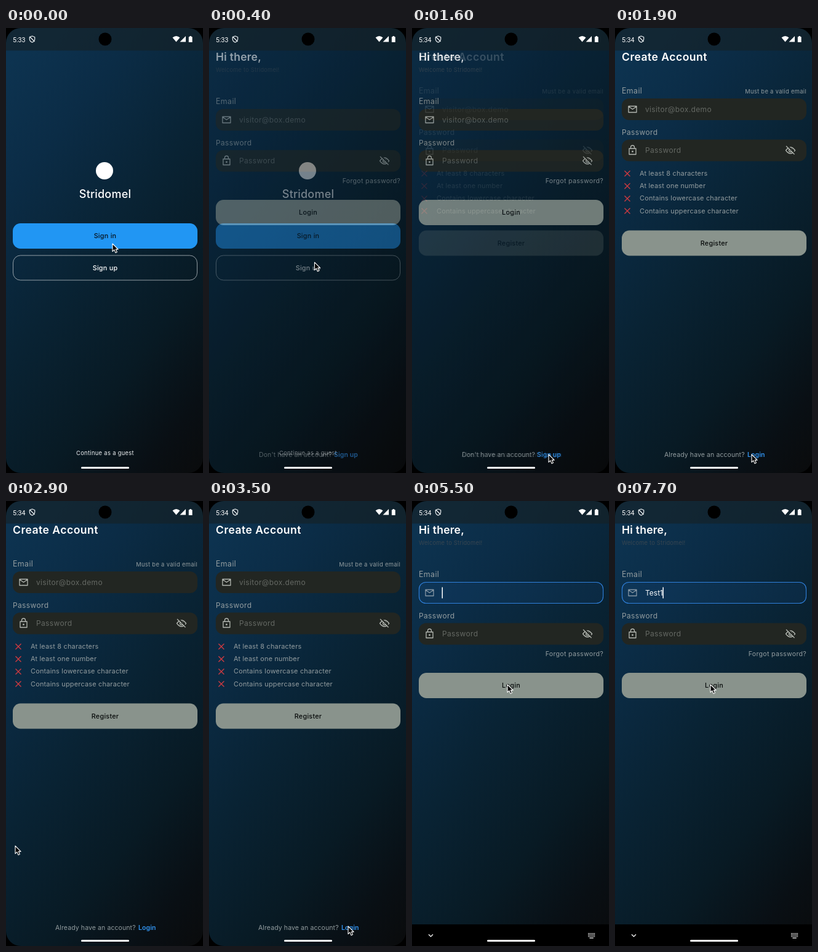
An HTML page with a canvas for the animation above (8 s loop, 320 px wide and 720 px high).

```html
<!DOCTYPE html>
<html lang="en">
<head>
<meta charset="utf-8">
<title>Sign in flow</title>
<style>
html, body { margin: 0; width: 100%; height: 100%; overflow: hidden; background: #000; }
canvas { display: block; width: 320px; height: 720px; }
</style>
</head>
<body>
<canvas id="stage" width="320" height="720"></canvas>
<script>
const W = 320, H = 720, LOOP = 8000, STEP = 100;
const APP = 'Stridomel', MAIL = 'visitor@box.demo';
const GREY = '#929c9f', HINT = '#646863', FIELD = '#222622', BLUE = '#2196f3';
const stage = document.getElementById('stage').getContext('2d');
const layer = document.createElement('canvas');
layer.width = W;
layer.height = H;
let c = stage;
let shade = 0;

const clamp = v => Math.max(0, Math.min(1, v));
const ramp = (t, a, b) => clamp((t - a) / (b - a));
const smooth = v => v * v * (3 - 2 * v);

// Time, x and y of the pointer tip
const pointer = [
  [0, 173, 349], [300, 173, 349], [600, 167, 465], [900, 180, 560], [1300, 222, 690],
  [2100, 222, 690], [2400, 120, 330], [2600, 45, 230], [2900, 15, 558], [3050, 15, 560],
  [3400, 226, 688], [3900, 226, 688], [4400, 141, 156], [4900, 141, 156], [5100, 155, 297]
];

function text(s, x, y, size, color, o = {}) {
  c.font = `${o.weight || 400} ${size}px ${o.font || 'Inter'}, sans-serif`;
  c.letterSpacing = (o.gap || 0) + 'px';
  c.textAlign = o.align || 'left';
  c.fillStyle = color;
  c.fillText(s, x, y);
}

function box(x, y, w, h, r, fill, line, width = 1) {
  c.beginPath();
  c.roundRect(x, y, w, h, r);
  if (fill) { c.fillStyle = fill; c.fill(); }
  if (line) { c.strokeStyle = line; c.lineWidth = width; c.stroke(); }
}

function path(d, x, y, { fill, line, width = 1.3, scale = 1 }) {
  const p = new Path2D(d);
  c.save();
  c.translate(x, y);
  c.scale(scale, scale);
  c.lineJoin = 'round';
  if (fill) { c.fillStyle = fill; c.fill(p); }
  if (line) { c.strokeStyle = line; c.lineWidth = width; c.stroke(p); }
  c.restore();
}

function dot(x, y, r, color) {
  c.beginPath();
  c.arc(x, y, r, 0, 7);
  c.fillStyle = color;
  c.fill();
}

function backdrop() {
  const g = c.createLinearGradient(0, 60, 517, 474);
  g.addColorStop(0, '#0d3350');
  g.addColorStop(.2, '#0b2c46');
  g.addColorStop(.45, '#092334');
  g.addColorStop(.7, '#081a24');
  g.addColorStop(.88, '#090f14');
  g.addColorStop(1, '#0a0b0c');
  c.fillStyle = g;
  c.fillRect(0, 0, W, H);
  c.fillStyle = `rgba(0,0,0,${shade})`;
  c.fillRect(0, 0, W, H);
}

function button(label, y, fill, color, line) {
  if (line) box(11.5, y + .5, 299, 40, 12, fill, line, .8);
  else box(11, y, 300, 41, 12.5, fill);
  text(label, 161, y + 24, 10.8, color, { weight: 500, gap: .25, align: 'center' });
}

function mailIcon(y, color) {
  path('M-6.5-5h13v10h-13zM-6.5-4.5L0 0L6.5-4.5', 28.5, y, { line: color });
}

function emailField(y, focus, typed, caret) {
  text('Email', 11, y - 8, 12.4, GREY, { gap: .4 });
  if (focus) box(11.5, y + .5, 299, 34, 11, 'rgba(33,110,190,.1)', '#2f80dc', 1.1);
  else box(11, y, 300, 35, 12, FIELD);
  mailIcon(y + 17.5, focus ? '#8797a5' : '#b4b8b2');
  if (!focus) {
    text(MAIL, 49, y + 21.5, 12, HINT, { gap: .35 });
    return;
  }
  text(typed, 49, y + 21.5, 12, '#f4f7f9');
  if (caret) {
    c.fillStyle = '#fff';
    c.fillRect(48.5 + c.measureText(typed).width, y + 8.5, 1.5, 18);
  }
}

function passwordField(y) {
  const color = '#b4b8b2';
  text('Password', 11, y - 8, 12, GREY, { gap: .35 });
  box(11, y, 300, 35, 12, FIELD);
  text('Password', 49, y + 21.5, 12, HINT, { gap: .35 });
  path('M-5.5-2.5h11v9.5h-11zM-3-2.5v-2a3 3 0 0 1 6 0v2', 28.5, y + 17, { line: color });
  dot(28.5, y + 19.3, 1.4, color);
  path('M-7.5 0Q0-10 7.5 0Q0 10-7.5 0zM-2.5 0a2.5 2.5 0 1 0 5 0a2.5 2.5 0 1 0-5 0', 285, y + 17.5, { line: color });
  path('M-6-7L7 6', 286, y + 17, { line: FIELD, width: 2.4 });
  path('M-7-7L6.5 6.5', 285, y + 17.5, { line: color });
}

function footer(ask, x, link, linkX) {
  text(ask, x, 693.5, 10.5, GREY, { gap: .1 });
  text(link, linkX, 693.5, 10.5, '#3295f2', { weight: 600, gap: .1 });
}

function welcome() {
  backdrop();
  dot(160, 231, 14, '#fff');
  text(APP, 161, 275, 18, '#fff', { weight: 500, gap: .2, align: 'center' });
  button('Sign in', 316, BLUE, '#07131e');
  button('Sign up', 367.5, null, '#fff', '#b5bdc2');
  text('Continue as a guest', 161, 691, 9.3, '#eef1f3', { gap: .35, align: 'center' });
}

function typedAt(t) {
  const marks = [[6700, 1], [6800, 3], [6900, 4], [7700, 5]];
  const hit = marks.filter(m => t >= m[0]).pop();
  return 'Test1'.slice(0, hit ? hit[1] : 0);
}

// The caret toggles every 250 ms and restarts with each key
function caretAt(t) {
  const start = t >= 7700 ? 7650 : t >= 6900 ? 6850 : t >= 6700 ? 6700 : 4500;
  return Math.floor((t - start) / 250) % 2 === 0;
}

function login(t) {
  const focus = t >= 4500;
  backdrop();
  text('Hi there,', 11, 53, 17.6, '#fff', { weight: 600, gap: .2 });
  text(`Welcome to ${APP}!`, 11, 71, 9.3, '#384651', { gap: .2 });
  emailField(131, focus, typedAt(t), caretAt(t));
  passwordField(197.5);
  text('Forgot password?', 311, 250.5, 10.6, GREY, { gap: .3, align: 'right' });
  button('Login', 278, '#89938c', '#080b0b');
  if (t < 4700) footer("Don't have an account?", 81, 'Sign up', 203);
}

function register() {
  backdrop();
  text('Create Account', 11, 53, 17.6, '#fff', { weight: 600, gap: .45 });
  emailField(114);
  text('Must be a valid email', 311, 105.5, 9.3, GREY, { gap: .35, align: 'right' });
  passwordField(180.5);
  ['At least 8 characters', 'At least one number',
    'Contains lowercase character', 'Contains uppercase character'].forEach((rule, i) => {
    const y = 235.5 + i * 20.2;
    path('M-4.5-4.5L4.5 4.5M4.5-4.5L-4.5 4.5', 20, y, { line: '#cf3a40', width: 1.4 });
    text(rule, 40, y + 3.5, 10.9, GREY, { gap: .2 });
  });
  button('Register', 327.5, '#89938c', '#080b0b');
  footer('Already have an account?', 80, 'Login', 215);
}

// Both backdrops are a little darker while one page gives way to the next
function crossfade(from, to, alpha) {
  shade = alpha > 0 && alpha < 1 ? .16 : 0;
  from();
  if (alpha <= 0) return;
  c = layer.getContext('2d');
  to();
  c = stage;
  c.globalAlpha = alpha;
  c.drawImage(layer, 0, 0);
  c.globalAlpha = 1;
}

function keyboardBar(k) {
  if (k <= 0) return;
  const y = H - 35 * k;
  c.fillStyle = '#000';
  c.fillRect(0, y, W, 35);
  path('M-3.5-1.7L0 1.7L3.5-1.7', 30.5, y + 18, { line: '#eee', width: 1.4 });
  c.fillStyle = '#ddd';
  for (let row = 0; row < 3; row++)
    for (let col = 0; col < 5; col++) c.fillRect(286 + col * 2.4, y + 14 + row * 2.4, 1.5, 1.5);
  c.fillRect(288.4, y + 21.4, 6.3, 1.4);
}

function statusBar(clock) {
  c.fillStyle = 'rgba(22,32,36,.6)';
  c.fillRect(0, 0, W, 36.5);
  text(clock, 11, 22.5, 10.7, '#fff', { font: 'Roboto' });
  path('M0-5L4.2-3.3V0Q4 3.6 0 5.2Q-4 3.6-4.2 0V-3.3zM-4-4L4 4', 42.5, 18, { line: '#eef2f4', width: 1.2 });
  dot(161, 18, 10.5, '#000');
  path('M0 9L-6 2Q0-3 6 2z', 276.5, 13.5, { fill: '#fff' });
  path('M0 9.5H9.5V0z', 282.5, 13, { fill: '#fff' });
  path('M0 1.3H1.6V0H4.2V1.3H5.8V10H0z', 296.8, 13, { fill: '#fff' });
}

function bezel() {
  c.beginPath();
  c.rect(0, 0, W, H);
  c.roundRect(0, 0, W, H, 24);
  c.fillStyle = '#000';
  c.fill('evenodd');
  box(122, 710, 78, 3, 1.5, '#fff');
}

function cursor(t) {
  let i = pointer.findIndex(p => p[0] > t);
  if (i < 0) i = pointer.length;
  const a = pointer[i - 1], b = pointer[i] || a;
  const k = a === b ? 0 : smooth(ramp(t, a[0], b[0]));
  path('M0 0V14L3.2 11L5.6 16.3L8.2 15.1L5.9 10.1H10.2z',
    a[1] + (b[1] - a[1]) * k, a[2] + (b[2] - a[2]) * k,
    { fill: '#050505', line: '#fff', width: 1.2, scale: .9 });
}

function draw(t) {
  const signIn = () => login(t);
  c = stage;
  if (t < 600) crossfade(welcome, signIn, ramp(t, 250, 520));
  else if (t < 3500) crossfade(signIn, register, ramp(t, 1550, 1820));
  else crossfade(register, signIn, ramp(t, 3550, 3820));
  keyboardBar(ramp(t, 4600, 4800));
  statusBar(t < 500 ? '5:33' : '5:34');
  bezel();
  cursor(t);
}

const begin = performance.now();
function tick() {
  const t = (performance.now() - begin) % LOOP;
  draw(Math.floor(t / STEP) * STEP);
  requestAnimationFrame(tick);
}
tick();
</script>
</body>
</html>
```
